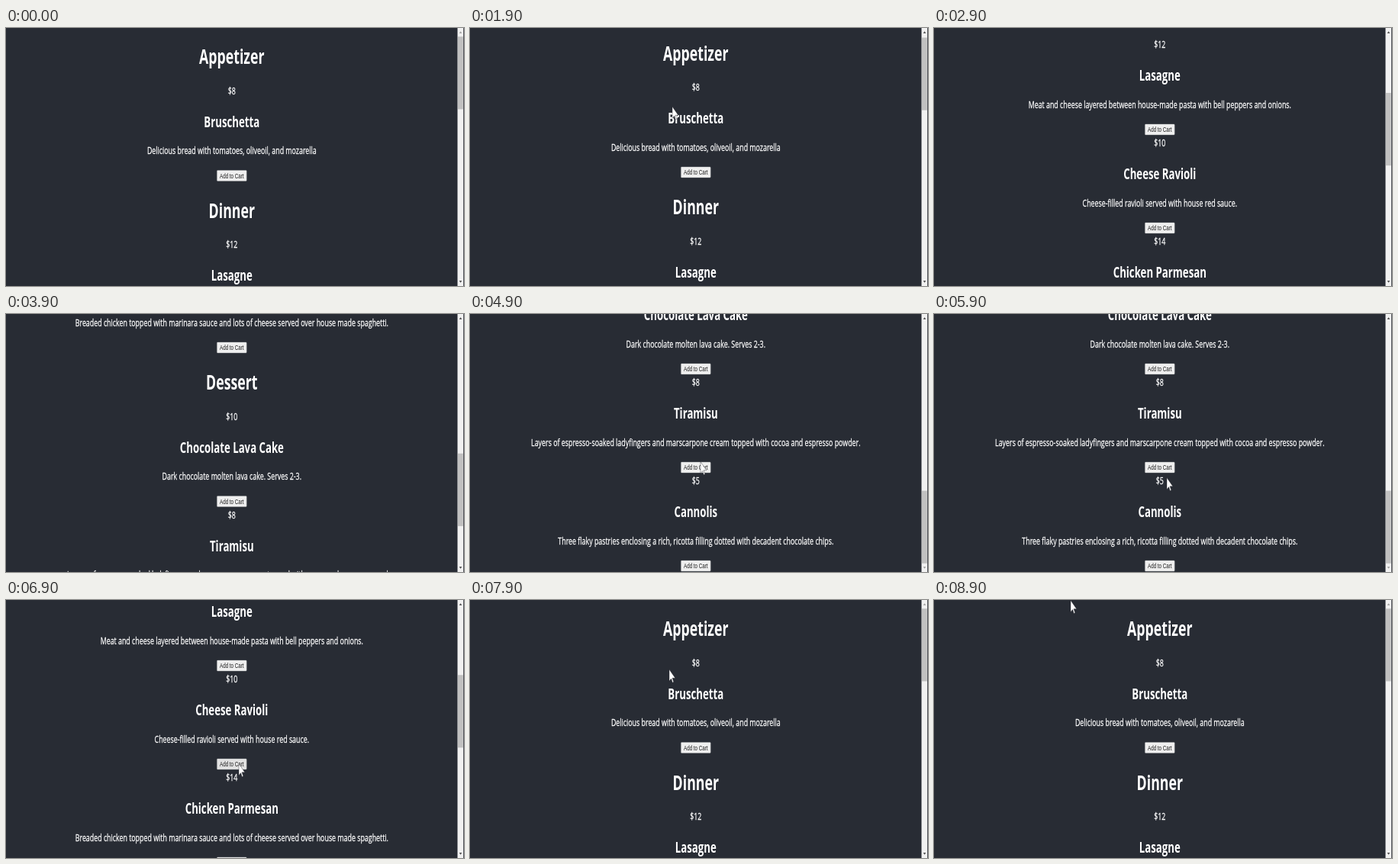
An HTML page for the animation above (9 s loop, 600 by 338 pixels).

```html
<!DOCTYPE html>
<html lang="en">
<head>
<meta charset="utf-8">
<title>Menu</title>
<style>
  html, body { margin: 0; width: 100%; height: 100%; overflow: hidden; background: #282c34; }
  svg { display: block; width: 100vw; height: 100vh; }
  text { text-anchor: middle; fill: #fff; font-family: "Open Sans", "Noto Sans", sans-serif; }
  .h1 { font-size: 26px; font-weight: 700; }
  .h2 { font-size: 19.4px; font-weight: 700; }
  .p { font-size: 13px; stroke: #fff; stroke-width: .3px; }
  .btn { font: 8.9px "Liberation Sans", Arial, sans-serif; fill: #1c1c1c; }
</style>
</head>
<body>
<svg viewBox="0 0 600 338" preserveAspectRatio="none">
  <rect width="600" height="338" fill="#282c34"/>
  <g id="page"></g>
  <rect x="591.5" width="7.7" height="338" fill="#f1f1f1"/>
  <rect id="thumb" x="592" width="6.8" fill="#c1c1c1"/>
  <path id="up" d="M593.7 7 L595.5 4.2 L597.3 7Z"/>
  <path id="down" d="M593.7 331 L595.5 333.8 L597.3 331Z"/>
  <path id="cursor" d="M0 0 V15.3 L2.6 12.1 L4.3 17.2 L5.8 16.3 L4.1 11.2 H7.8Z"
        fill="#fff" stroke="#1c1e24" stroke-width=".4"/>
</svg>
<script>
const MENU = [
  ["Appetizer", [
    ["$8", "Bruschetta", "Delicious bread with tomatoes, oliveoil, and mozarella"]]],
  ["Dinner", [
    ["$12", "Lasagne", "Meat and cheese layered between house-made pasta with bell peppers and onions."],
    ["$10", "Cheese Ravioli", "Cheese-filled ravioli served with house red sauce."],
    ["$14", "Chicken Parmesan", "Breaded chicken topped with marinara sauce and lots of cheese served over house made spaghetti."]]],
  ["Dessert", [
    ["$10", "Chocolate Lava Cake", "Dark chocolate molten lava cake. Serves 2-3."],
    ["$8", "Tiramisu", "Layers of espresso-soaked ladyfingers and marscarpone cream topped with cocoa and espresso powder."],
    ["$5", "Cannolis", "Three flaky pastries enclosing a rich, ricotta filling dotted with decadent chocolate chips."]]]
];

// start time, scroll offset, pointer tip (optional)
const STEPS = [
  [0, 0],
  [1900, 4.5, 265, 103],
  [2900, 262],
  [3900, 609],
  [4900, 782.5, 302, 193.5],
  [5900, 782.5, 305, 214.5],
  [6900, 309, 305, 214.5],
  [7900, 0, 261, 91],
  [8900, 0, 179, 0.5]
];

const LOOP = 9000, VIEW = 338, MAX_SCROLL = 782.5;
const CX = 295.8, SQUEEZE = 0.682, BTN_SQUEEZE = 0.702;
const BTN_W = 38.8, BTN_H = 14;
const ARROW = 11.3, TRACK = VIEW - 2 * ARROW;
const THUMB = TRACK * VIEW / (VIEW + MAX_SCROLL);
const $ = id => document.getElementById(id);
const buttons = [];

// The page is seen in a narrowed aspect ratio, so all text shares one squeeze.
function add(tag, attrs, label = "") {
  const el = document.createElementNS("http://www.w3.org/2000/svg", tag);
  for (const key in attrs) el.setAttribute(key, attrs[key]);
  el.textContent = label;
  $("page").append(el);
  return el;
}

function write(kind, label, y, squeeze = SQUEEZE) {
  add("text", { class: kind, transform: `translate(${CX} ${y}) scale(${squeeze} 1)` }, label);
}

function button(y) {
  const el = add("rect", { x: CX - BTN_W / 2, y: y - BTN_H / 2, width: BTN_W, height: BTN_H,
    rx: 1, stroke: "#a0a2a5", "stroke-width": 0.4 });
  buttons.push({ el, y });
  write("btn", "Add to Cart", y + 3.1, BTN_SQUEEZE);
}

function build() {
  let y = -8;
  for (const [title, dishes] of MENU) {
    write("h1", title, y += 55);
    y += 17.5;
    for (const [price, name, about] of dishes) {
      write("p", price, y += 22);
      write("h2", name, y += 43);
      write("p", about, y += 35.5);
      button(y += 28.5);
    }
  }
}

function draw(t) {
  const [, scroll, x, y] = STEPS.findLast(step => step[0] <= t);
  $("page").setAttribute("transform", `translate(0 ${-scroll})`);
  $("thumb").setAttribute("y", ARROW + (TRACK - THUMB) * scroll / MAX_SCROLL);
  $("up").setAttribute("fill", scroll > 0 ? "#505050" : "#a3a3a3");
  $("down").setAttribute("fill", scroll < MAX_SCROLL ? "#505050" : "#a3a3a3");
  $("cursor").setAttribute("visibility", x === undefined ? "hidden" : "visible");
  if (x !== undefined) $("cursor").setAttribute("transform", `translate(${x} ${y})`);
  for (const b of buttons) {
    const hover = Math.abs(x - CX) < BTN_W / 2 && Math.abs(y + scroll - b.y) < BTN_H / 2;
    b.el.setAttribute("fill", hover ? "#e2e2e2" : "#efefef");
  }
}

build();
$("thumb").setAttribute("height", THUMB);
const start = performance.now();
function tick() {
  draw((performance.now() - start) % LOOP);
  requestAnimationFrame(tick);
}
tick();
</script>
</body>
</html>
```
